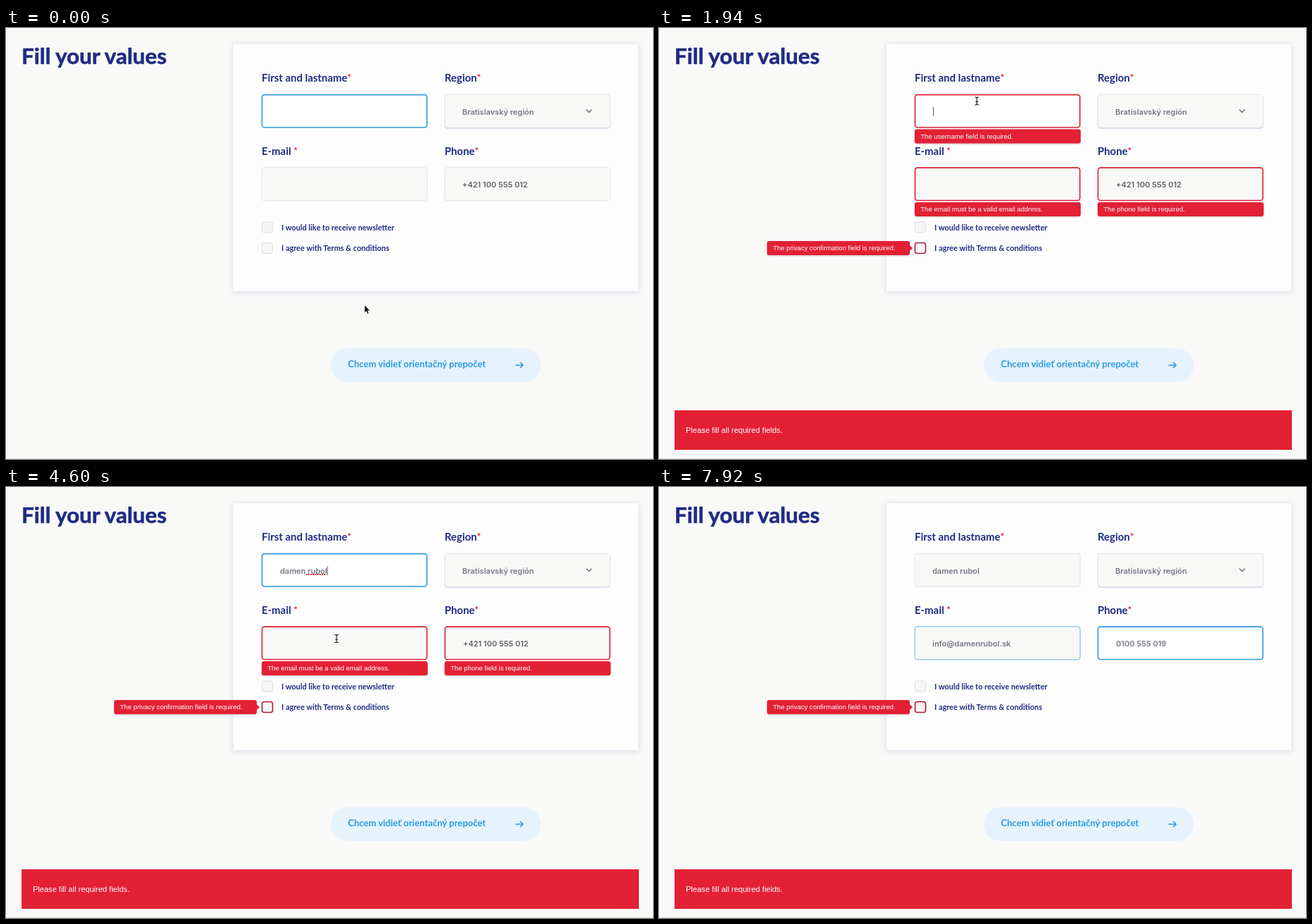
An HTML page that plays this animation: 916x611 px, repeating every 8000 ms.

```html
<!DOCTYPE html>
<html lang="en">
<head>
<meta charset="utf-8">
<title>Form validation</title>
<style>
  html, body { margin: 0; width: 100%; height: 100%; overflow: hidden; background: #f9f9f8; }
  svg { position: absolute; left: 0; top: 0; }
  text { white-space: pre; }
  .brand { font-family: Lato, sans-serif; font-weight: 700; fill: #1f2b84; }
  .title { stroke: #1f2b84; stroke-width: .6; }
  .value { font: 600 11px Inter, sans-serif; fill: #777886; }
  .note { font: 9.53px "Liberation Sans", Arial, sans-serif; fill: #fff; }
  .star { fill: #e8192f; }
  .card { filter: drop-shadow(0 1px 4px rgba(80, 85, 170, .2)); }
  .select { filter: drop-shadow(0 1px .6px rgba(80, 85, 170, .22)); }
  .tip { filter: drop-shadow(0 1px 1px rgba(120, 20, 40, .3)); }
  .line { fill: none; stroke-linecap: round; stroke-linejoin: round; }
  #spinner {
    position: absolute; left: 400.5px; top: 460px; width: 36px; height: 36px; border-radius: 50%;
    background: conic-gradient(rgba(42, 155, 228, 0) 6%, rgba(42, 155, 228, .45) 40%, #2a9be4 75%);
    -webkit-mask: radial-gradient(circle, transparent 14.5px, #000 15px);
    mask: radial-gradient(circle, transparent 14.5px, #000 15px);
  }
</style>
</head>
<body>
<svg id="stage" width="916" height="611" viewBox="0 0 916 611">
  <rect y="610" width="916" height="1" fill="#e0e0d6"/>
  <text class="brand title" x="22" y="51" font-size="31.3">Fill your values</text>
  <rect class="card" x="322" y="23" width="573" height="350" fill="#fdfdfd"/>
  <g id="form"></g>
  <path class="line" d="M822 116l3.5 3.5 3.5-3.5" stroke="#72727e" stroke-width="1.6"/>
  <g id="button">
    <rect x="460" y="454" width="297" height="48" rx="24"/>
    <text class="brand" x="484" y="481" font-size="13.05">Chcem vidieť orientačný prepočet</text>
    <path class="line" d="M722 478h10m-3.5-3.5l3.5 3.5-3.5 3.5" stroke-width="1.7"/>
  </g>
  <g id="bar">
    <rect x="22" y="542" width="874" height="56" fill="#e32034"/>
    <text class="note" x="38" y="574" style="font-size:11.05px">Please fill all required fields.</text>
  </g>
  <path id="spelling" d="M424.5 124h29" stroke="#e0243c" stroke-width="1.8" stroke-dasharray="2 1.2"/>
  <g id="cursor">
    <path id="arrow" d="M0 0v11.2l2.6-2.4 1.8 4 1.9-.8-1.7-3.9h3.6z" fill="#000" stroke="#fff" stroke-width=".8"/>
    <path id="hand" d="M-1.4 0Q0-1.4 1 .2V4.4Q2.4 3.6 3.1 4.8 4.5 4.2 5.1 5.4 6.7 5.2 6.7 6.8V9.5L5.2 13H-.6L-4.2 8.4Q-4.4 6.6-2.7 7L-1.4 8.2z" fill="#fff" stroke="#000" stroke-width="1"/>
    <path id="beam" class="line" d="M-2.5-5.5Q0-5.5 0-4V4Q0 5.5-2.5 5.5M2.5-5.5Q0-5.5 0-4M0 4Q0 5.5 2.5 5.5M-1.5 1h3" stroke="#222" stroke-width="1.2"/>
  </g>
</svg>
<div id="spinner"></div>
<script>
const LOOP = 8000;
const RED = [222, 30, 50], BLUE = [42, 155, 224], GREY = [226, 226, 234], WHITE = [255, 255, 255];
const $ = id => document.getElementById(id);
const form = $('form');

function add(tag, attrs, parent = form, text = '') {
  const node = document.createElementNS('http://www.w3.org/2000/svg', tag);
  set(node, attrs);
  node.textContent = text;
  parent.append(node);
  return node;
}
function set(node, attrs) { for (const key in attrs) node.setAttribute(key, attrs[key]); }
const show = (node, on) => { node.style.display = on ? '' : 'none'; };
const within = (t, spans) => spans.some(([from, to]) => t >= from && t < to);
const ramp = (t, from, to) => Math.min(1, Math.max(0, (t - from) / (to - from)));
const mix = (a, b, k) => `rgb(${a.map((v, i) => v + (b[i] - v) * k)})`;

// Both submissions: errors clear when one starts and return with the response.
const SENDING = [[370, 780], [3120, 3660]];
const FAILED = [[780, 3120], [3660, LOOP]];

function tip(x, y, width, message) {
  const g = add('g', { class: 'tip' });
  add('rect', { x, y, width, height: 20, rx: 3, fill: '#e32034' }, g);
  add('text', { class: 'note', x: x + 8.3, y: y + 13 }, g, message);
  return g;
}

function field(o) {
  const { x, y } = o;
  const label = add('text', { class: 'brand', x, y: y - 18, 'font-size': 14.9 }, form, o.label);
  add('tspan', { class: 'star', 'font-size': 13, dy: -1 }, label, '*');
  o.box = add('rect', { class: o.style || '' });
  o.text = add('text', { class: 'value', y: y + 28.5 });
  o.caret = add('rect', { y: y + 18, width: 1, height: 13, fill: '#555' });
  if (o.error) o.tip = tip(x, y + 49.5, 235, o.error);
  return o;
}

const fields = [
  field({
    x: 362, y: 94, label: 'First and lastname', error: 'The username field is required.',
    value: 'damen rubol', start: 2080, step: 90, focus: [[0, 320], [1780, 4650]],
    hover: [[1700, 4400]], blink: [-500, 1780, 3540]
  }),
  field({ x: 621, y: 94, label: 'Region', hint: 'Bratislavský región', style: 'select' }),
  field({
    x: 362, y: 197.5, label: 'E-mail ', error: 'The email must be a valid email address.',
    value: 'info@damenrubol.sk', start: 4760, step: 80, focus: [[4650, 6500]],
    hover: [[4520, LOOP]], blink: [4650]
  }),
  field({
    x: 621, y: 197.5, label: 'Phone', error: 'The phone field is required.',
    hint: '+421 100 555 012', hintColor: '#626266',
    value: '0100 555 019', start: 6700, step: 60, focus: [[6500, LOOP]], blink: [6500]
  })
];

function checkbox(y, label) {
  add('text', { class: 'brand', x: 390, y: y + 12, 'font-size': 10.93 }, form, label);
  return add('rect', { x: 362.5, y: y + .5, width: 15, height: 15, rx: 3, fill: '#f6f6f5', stroke: '#dedee2' });
}
checkbox(274.5, 'I would like to receive newsletter');
const agree = checkbox(304, 'I agree with Terms & conditions');
const agreeTip = tip(153, 302, 202, 'The privacy confirmation field is required.');
add('path', { d: 'M354.5 308l4.5 4-4.5 4z', fill: '#e32034' }, agreeTip);

function errorLevel(t) {
  if (t < 3040) return ramp(t, 760, 900);
  return t < 3500 ? 1 - ramp(t, 3040, 3180) : ramp(t, 3500, 3600);
}

function drawField(f, t) {
  const focused = within(t, f.focus || []);
  const hovered = within(t, f.hover || []);
  const typed = f.value ? Math.min(f.value.length, Math.max(0, Math.floor((t - f.start) / f.step) + 1)) : 0;
  const faulty = f.error && !typed;
  const level = faulty ? errorLevel(t) : 0;
  const active = focused || level > 0;
  const width = active ? 1.6 : 1;
  const base = focused ? BLUE : hovered ? [105, 180, 232] : GREY;
  set(f.box, {
    x: f.x - .3 + width / 2, y: f.y - .2 + width / 2, width: 235 - width, height: 48 - width, rx: 3.5,
    fill: focused ? '#fff' : '#f8f8f7', stroke: mix(base, RED, level), 'stroke-width': width
  });
  const left = f.x + (active ? 26 : 25);
  f.text.setAttribute('x', left);
  f.text.textContent = typed ? f.value.slice(0, typed) : f.hint || '';
  f.text.style.fill = typed ? '' : f.hintColor || '';
  if (f.tip) show(f.tip, faulty && within(t, FAILED));

  let visible = false;
  if (focused) {
    const lastKey = f.start + (typed - 1) * f.step;
    const resets = f.blink.filter(time => time <= t);
    if (typed) resets.push(lastKey);
    visible = (t - Math.max(...resets)) % 1000 < 500;
    f.caret.setAttribute('x', left + (typed ? f.text.getComputedTextLength() : 0));
  }
  show(f.caret, visible);
}

const PATH = [[0, 507.5, 392.8], [300, 543, 477], [1180, 543, 477], [1740, 450, 103.5], [4280, 450, 103.5], [4600, 468, 215]];
function pointer(t) {
  const next = PATH.findIndex(point => point[0] > t);
  if (next < 0) return PATH[PATH.length - 1].slice(1);
  const [t0, x0, y0] = PATH[next - 1], [t1, x1, y1] = PATH[next];
  const p = ramp(t, t0, t1), k = p * p * (3 - 2 * p);
  return [x0 + (x1 - x0) * k, y0 + (y1 - y0) * k];
}

function drawCursor(t) {
  const [x, y] = pointer(t);
  const overButton = x > 460 && x < 757 && y > 454 && y < 502;
  const overField = x > 362 && x < 597 && fields.some(f => y > f.y && y < f.y + 48);
  set($('cursor'), { transform: `translate(${x} ${y})` });
  show($('cursor'), t < 2080 || (t >= 4280 && t < 4760));
  show($('hand'), overButton);
  show($('beam'), overField);
  show($('arrow'), !overButton && !overField);
}

function drawButton(t) {
  const hover = ramp(t, 160, 300) * (1 - ramp(t, 1320, 1480));
  const [rect, label, arrow] = $('button').children;
  const ink = mix([42, 155, 228], WHITE, hover);
  rect.style.fill = mix([230, 243, 253], [38, 155, 238], hover);
  label.style.fill = ink;
  arrow.style.stroke = ink;
}

function draw(t) {
  fields.forEach(f => drawField(f, t));
  const level = errorLevel(t);
  set(agree, { stroke: mix([222, 222, 226], [176, 26, 50], level), 'stroke-width': 1 + .6 * level });
  show(agreeTip, within(t, FAILED));
  show($('bar'), within(t, FAILED));
  show($('spelling'), t >= 3400 && t < 4650);
  show($('spinner'), within(t, SENDING));
  $('spinner').style.transform = `rotate(${(t - 3620) * .36}deg)`;
  drawButton(t);
  drawCursor(t);
}

const began = performance.now();
function frame() {
  draw((performance.now() - began) % LOOP);
  requestAnimationFrame(frame);
}
frame();
</script>
</body>
</html>
```
